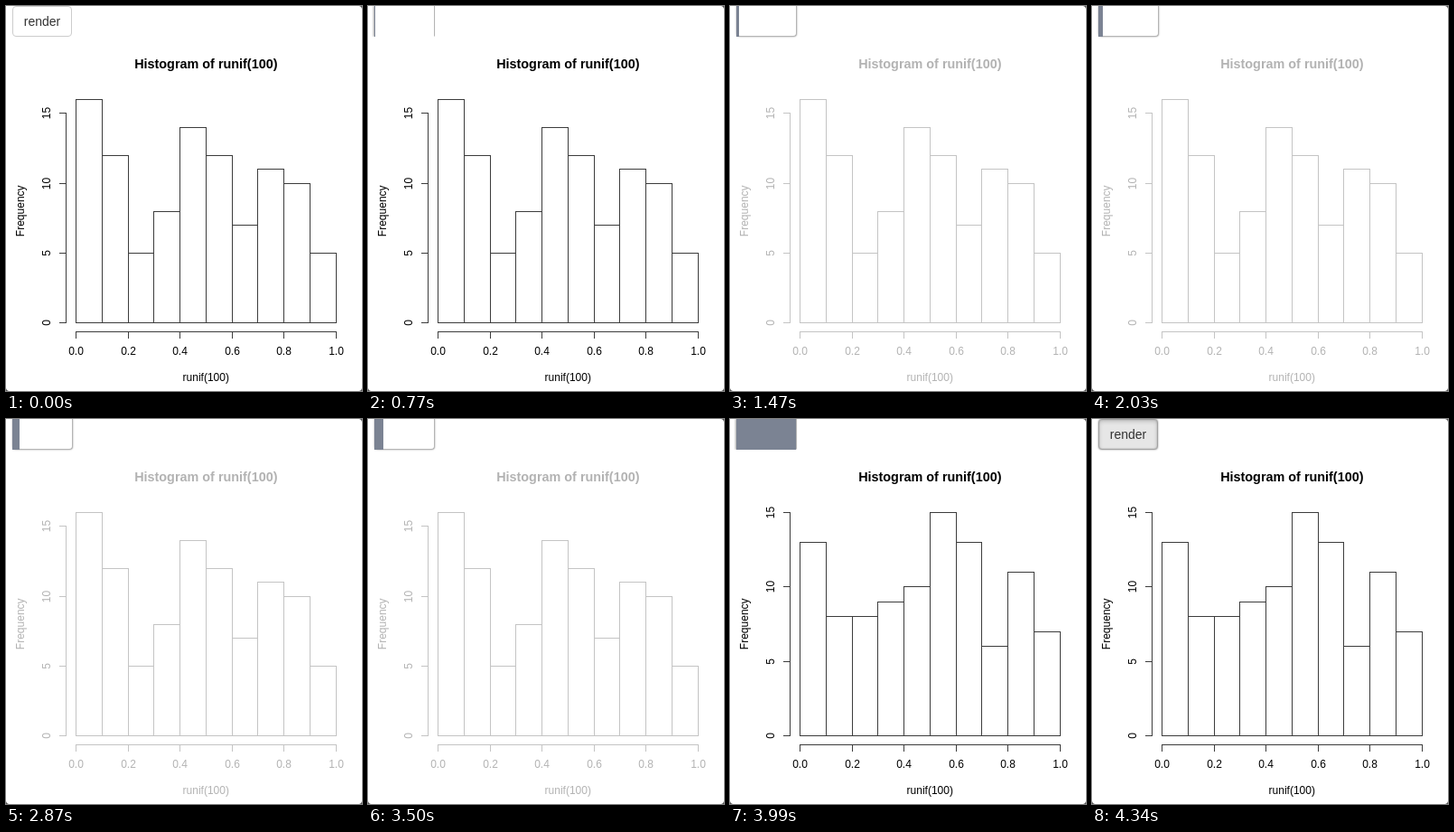
These frames come from a looping animation (394x426 px, 4690 ms). An HTML page:

```html
<!DOCTYPE html>
<html lang="en">
<head>
<meta charset="utf-8">
<title>Render button</title>
<style>
  html, body { margin: 0; width: 100%; height: 100%; overflow: hidden; background: #fff; }
  #stage { position: relative; width: 394px; height: 426px; overflow: hidden; background: #fff;
    font-family: "Liberation Sans", Arial, sans-serif; }
  #stage * { box-sizing: border-box; }
  .anim { animation: 4690ms step-end infinite; }

  svg { position: absolute; left: 0; top: 0; }
  .plot { fill: #000; font-size: 12px; text-anchor: middle; }
  .plot path { fill: none; stroke: #3c3c3c; shape-rendering: crispEdges; }
  .plot .title { font-size: 14.4px; font-weight: bold; }
  #before { animation-name: before; }
  #after { animation-name: after; }

  .btn, .well { position: absolute; left: 7px; top: 0; height: 34px; }
  .btn { width: 66px; border: 1px solid #ccc; border-radius: 4px; background: #fff;
    color: #333; font-size: 14px; line-height: 32px; text-align: center; }
  #idle { animation-name: idle; }
  #pressed { animation-name: pressed; background: #e6e6e6; border-color: #a2a2a2;
    box-shadow: 0 0 2px rgba(0,0,0,.45), inset 0 2px 4px rgba(0,0,0,.16), inset 0 0 2px rgba(0,0,0,.2); }
  .well { width: 67px; background: #fff; border: 1px solid #b4b4b4; border-top: 0;
    border-left-color: #8a8a8a; animation-name: well; }
  #bar { position: absolute; left: -1px; top: 0; height: 34px; background: #7b8393; animation-name: bar; }

  @keyframes before {
    0% { opacity: 1 }
    20.89% { opacity: .92 }
    22.38% { opacity: .53 }
    23.87% { opacity: .37 }
    25.37% { opacity: .32 }
    26.86% { opacity: .3 }
    79.1%, 100% { opacity: 0 }
  }
  @keyframes after {
    0% { opacity: 0 }
    79.1%, 100% { opacity: 1 }
  }
  @keyframes idle {
    0% { opacity: 1 }
    11.94%, 100% { opacity: 0 }
  }
  @keyframes well {
    0% { opacity: 0 }
    11.94%, 79.1% { opacity: 1; border-bottom-color: #fff; border-radius: 0;
      clip-path: inset(0 -3px 0 -3px); box-shadow: -1px 0 2px rgba(0,0,0,.35) }
    20.89% { opacity: 1; border-bottom-color: #b4b4b4; border-radius: 0 0 4px 4px;
      clip-path: inset(0 -3px -3px -3px); box-shadow: 0 0 2px rgba(0,0,0,.4) }
    92.53%, 100% { opacity: 0 }
  }
  @keyframes bar {
    0% { width: 0 }
    16.41% { width: 1px }
    23.87% { width: 2px }
    31.34% { width: 3px }
    37.31% { width: 4px }
    43.28% { width: 5px }
    50.74% { width: 6px }
    55.22% { width: 7px }
    61.19% { width: 8px }
    67.16% { width: 9px }
    74.62% { width: 10px }
    79.1% { width: 16px }
    80.59% { width: 45px }
    82.08% { width: 59px }
    83.58% { width: 64px }
    85.07%, 100% { width: 66px }
  }
  @keyframes pressed {
    0% { opacity: 0 }
    89.55% { opacity: .35 }
    91.04% { opacity: .75 }
    92.53%, 100% { opacity: 1 }
  }
</style>
</head>
<body>
<div id="stage">
  <svg width="394" height="426">
    <g id="before" class="plot anim"></g>
    <g id="after" class="plot anim"></g>
    <path d="M0 423v3h3q-2.500-.5-3-3zM394 423v3h-3q2.500-.5 3-3zM394 3v-3h-3q2.500.5 3 3z" fill="#555"/>
  </svg>
  <div id="idle" class="btn anim">render</div>
  <div class="well anim"><div id="bar" class="anim"></div></div>
  <div id="pressed" class="btn anim">render</div>
</div>
<script>
  const label = (x, y, text, cls = '') => `<text class="${cls}" x="${x}" y="${y}">${text}</text>`;
  const upright = (x, y, text) => `<text transform="translate(${x} ${y}) rotate(-90)">${text}</text>`;

  function histogram(id, counts, unit) {
    const px = v => Math.floor(77.7 + 287.5 * v) + .5;
    const py = n => Math.round(350.4 - unit * n) + .5;
    let lines = '', text = '';

    counts.forEach((n, i) => {
      lines += `M${px(i / 10)} ${py(0)}V${py(n)}H${px((i + 1) / 10)}V${py(0)}Z`;
    });

    lines += `M${px(0)} 360.5H${px(1)}M66.5 ${py(0)}V${py(15)}`;
    for (let i = 0; i <= 5; i++) {
      const x = px(i / 5);
      lines += `M${x} 360V368`;
      text += label(x, 386.3, (i / 5).toFixed(1));
    }
    for (let n = 0; n <= 15; n += 5) {
      lines += `M59 ${py(n)}H67`;
      text += upright(48.8, py(n), n);
    }

    text += label(221.3, 69, 'Histogram of runif(100)', 'title')
          + label(221.3, 415.2, 'runif(100)')
          + upright(20, 226.8, 'Frequency');
    document.getElementById(id).innerHTML = `<path d="${lines}"/>${text}`;
  }

  histogram('before', [16, 12, 5, 8, 14, 12, 7, 11, 10, 5], 15.475);
  histogram('after', [13, 8, 8, 9, 10, 15, 13, 6, 11, 7], 16.507);
</script>
</body>
</html>
```
